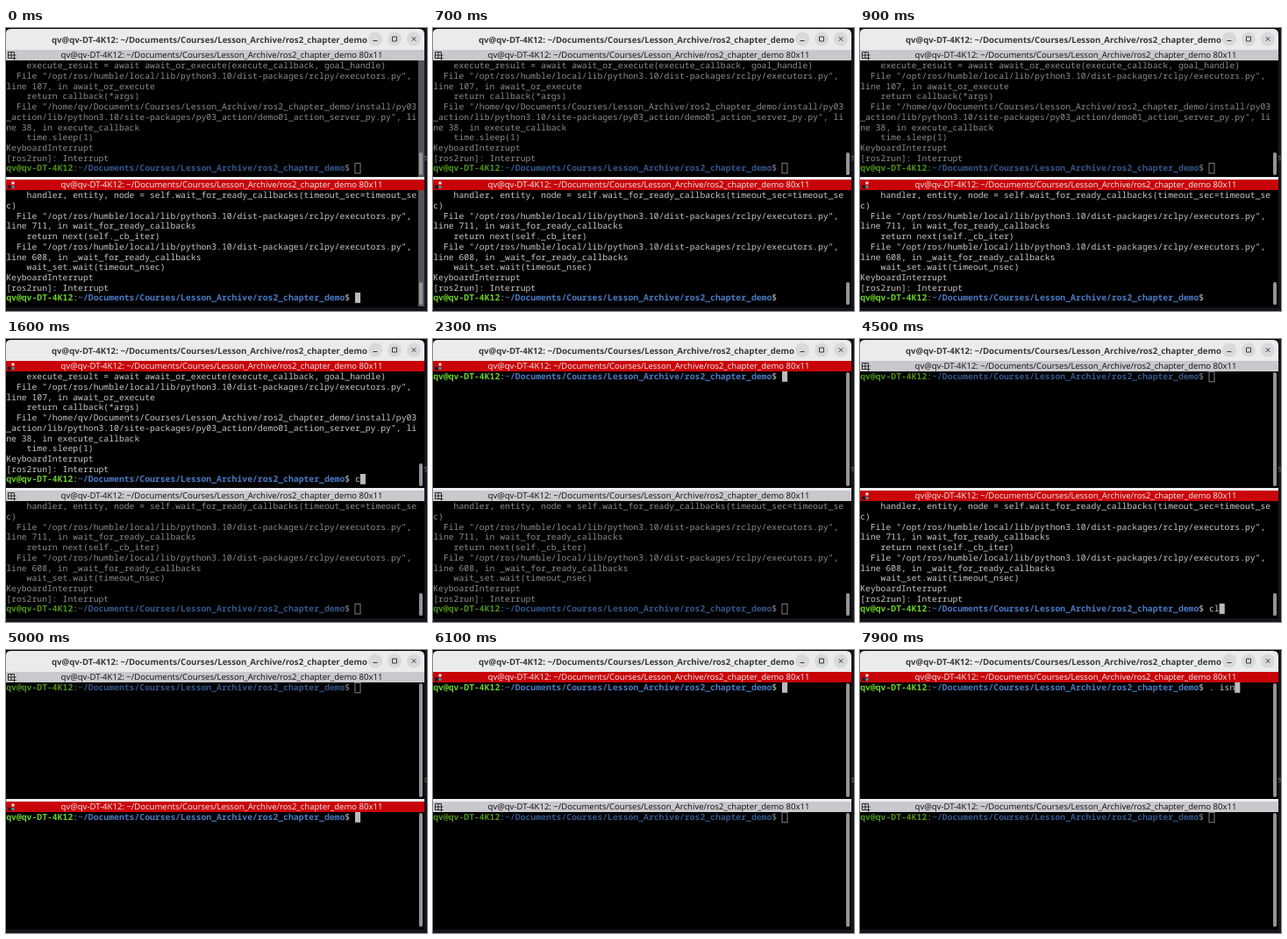
Recreate the animation shown at these times as an HTML page. Size 480 px wide and 323 px high, loop 8000 ms.

```html
<!DOCTYPE html>
<html lang="en">
<head>
<meta charset="utf-8">
<title>Split terminal</title>
<style>
  html, body { margin: 0; width: 100%; height: 100%; overflow: hidden; background: #15151d; }
  svg { display: block; width: 100vw; height: 100vh; }
  text { white-space: pre; text-rendering: geometricPrecision; }
  .mono { font: 9.75px "Noto Sans Mono", "DejaVu Sans Mono", monospace; fill: #c6c6c6; }
  .bold { font-weight: 700; }
  .user { fill: #6dd127; }
  .path { fill: #4a7bc4; }
  .title { font: 700 9.68px "Open Sans", "Noto Sans", sans-serif; fill: #3a3a3c; text-anchor: middle; }
  .head { font: 9.55px "Open Sans", "Noto Sans", sans-serif; text-anchor: middle; }
</style>
</head>
<body>
<svg id="stage" viewBox="0 0 480 323"></svg>
<script>
const LOOP = 8000, CELL = 5.85, ROW = 11.7;
const USER = "qv@qv-DT-4K12";
const DIR = "~/Documents/Courses/Lesson_Archive/ros2_chapter_demo";
const PROMPT_COLS = USER.length + DIR.length + 3;
const EXECUTORS = '  File "/opt/ros/humble/local/lib/python3.10/dist-packages/rclpy/executors.py",';
const ENDING = ["KeyboardInterrupt", "[ros2run]: Interrupt"];

const stage = document.getElementById("stage");

function add(parent, tag, attrs = {}, text = "") {
  const el = document.createElementNS("http://www.w3.org/2000/svg", tag);
  for (const k in attrs) el.setAttribute(k, attrs[k]);
  el.textContent = text;
  parent.append(el);
  return el;
}
const rect = (parent, x, y, width, height, fill, more) =>
  add(parent, "rect", { x, y, width, height, fill, ...more });
const set = (el, attrs) => { for (const k in attrs) el.setAttribute(k, attrs[k]); };
const show = (el, on) => el.setAttribute("visibility", on ? "visible" : "hidden");

function drawWindow() {
  rect(stage, 0, 0, 480, 323, "#15151d");
  rect(stage, 0, 0, 477, 319, "#000");
  add(stage, "path", { d: "M0 25V6Q0 1 6 1H471Q477 1 477 7V25Z", fill: "#ebeaed" });
  add(stage, "text", { x: 232, y: 16.6, class: "title" }, `${USER}: ${DIR}`);
  for (const cx of [421, 443, 465])
    add(stage, "circle", { cx, cy: 12.5, r: 8, fill: "#d9d8db" });
  add(stage, "path", {
    d: "M418.5 14.5h5M440.5 10h5v5h-5zM462.7 10.2l4.6 4.6m0-4.6l-4.6 4.6",
    fill: "none", stroke: "#3a3a3c", "stroke-width": 1
  });
  rect(stage, 0, 170, 477, 3, "#eeedf0");
  add(stage, "text", { x: 476, y: 151, class: "mono", opacity: .5 }, "s");
}

function makePane(top, lines) {
  const g = add(stage, "g", { transform: `translate(0 ${top})` });
  const bar = rect(g, 0, 0, 477, 12);
  const head = add(g, "text", { x: 246, y: 9.3, class: "head" }, `${USER}: ${DIR} 80x11`);

  const groupIcon = add(g, "path", {
    d: "M2.5 2.5h7v7h-7zM2.5 6h9M6 2.5v7M9.5 7v4.5M7.5 9.5h4",
    fill: "none", stroke: "#2a2a2c", "stroke-width": 1
  });
  const liveIcon = add(g, "g");
  rect(liveIcon, 2, 6.5, 4, 4, "#1e2024");
  rect(liveIcon, 6.5, 2.5, 3, 3, "#e6e6e6");
  rect(liveIcon, 6.5, 7, 3, 3, "#4d8f96");

  const body = add(g, "g", { transform: "translate(0.2 12)" });
  const log = add(body, "g");
  const line = (parent, row, text) =>
    add(parent, "text", { x: 0, y: row * ROW + 9.3, class: "mono" }, text);
  lines.forEach((text, i) => line(log, i, text));

  const input = add(body, "g");
  const prompt = line(input, 0, "");
  add(prompt, "tspan", { class: "bold user" }, USER);
  add(prompt, "tspan", {}, ":");
  add(prompt, "tspan", { class: "bold path" }, DIR);
  add(prompt, "tspan", {}, "$ ");
  const typed = line(input, 0, "");
  typed.setAttribute("x", PROMPT_COLS * CELL);
  const cursor = rect(input, 0, 0, 6.1, 11.8, "#bcbcbe");
  const hollow = rect(input, 0, .3, 6, 11.5, "none", { stroke: "#b8b8b8", "stroke-width": 1 });
  const trough = rect(g, 470, 12, 7, 133, "#55555a");
  const thumb = rect(g, 471, 0, 4, 26, "#949496", { rx: 2 });

  return ({ focus, cleared, text, blink, hover }) => {
    bar.setAttribute("fill", focus ? "#c80408" : "#c9c8cc");
    head.setAttribute("fill", focus ? "#f4eef0" : "#101012");
    show(liveIcon, focus);
    show(groupIcon, !focus);
    show(log, !cleared);
    body.setAttribute("opacity", focus ? 1 : .7);
    input.setAttribute("transform", `translate(0 ${cleared ? 0 : 10 * ROW})`);
    typed.textContent = text;
    const x = (PROMPT_COLS + text.length) * CELL;
    cursor.setAttribute("x", x);
    hollow.setAttribute("x", x);
    show(cursor, focus && blink);
    show(hollow, !focus);
    trough.setAttribute("opacity", hover);
    set(thumb, cleared ? { y: 13, height: 130 } : { y: 117, height: 26 });
  };
}

drawWindow();
const upper = makePane(25, [
  "    execute_result = await await_or_execute(execute_callback, goal_handle)",
  EXECUTORS,
  "line 107, in await_or_execute",
  "    return callback(*args)",
  '  File "/home/qv' + DIR.slice(1) + "/install/py03",
  '_action/lib/python3.10/site-packages/py03_action/demo01_action_server_py.py", li',
  "ne 38, in execute_callback",
  "    time.sleep(1)",
  ...ENDING
]);
const lower = makePane(173, [
  "    handler, entity, node = self.wait_for_ready_callbacks(timeout_sec=timeout_se",
  "c)",
  EXECUTORS,
  "line 711, in wait_for_ready_callbacks",
  "    return next(self._cb_iter)",
  EXECUTORS,
  "line 608, in _wait_for_ready_callbacks",
  "    wait_set.wait(timeout_nsec)",
  ...ENDING
]);

// Each command: its text, the time of each key, and when Enter clears the line.
const upperKeys = [
  { text: "clear", keys: [1600, 1900, 2000, 2100, 2200], enter: 2300 },
  { text: ". isn", keys: [7600, 7700, 7800, 7800, 7900], enter: LOOP }
];
const lowerKeys = [
  { text: "clear", keys: [4100, 4500, 4600, 4700, 4800], enter: 4900 }
];
const cursorOff = [[400, 1000], [2900, 3500], [5500, 6100], [6700, 7300]];

function typedAt(commands, t) {
  const cmd = commands.find(c => t < c.enter);
  return cmd ? cmd.text.slice(0, cmd.keys.filter(k => k <= t).length) : "";
}

function render(t) {
  const onTop = (t >= 1300 && t < 3700) || t >= 6100;
  const blink = !cursorOff.some(([a, b]) => t >= a && t < b);
  const hover = Math.max(0, 1 - t / 500);   // scrollbar tracks fade out
  upper({ focus: onTop, cleared: t >= 2300, text: typedAt(upperKeys, t), blink, hover });
  lower({ focus: !onTop, cleared: t >= 4900, text: typedAt(lowerKeys, t), blink, hover });
}

const start = performance.now();
function tick() {
  render((performance.now() - start) % LOOP);
  requestAnimationFrame(tick);
}
tick();
</script>
</body>
</html>
```
